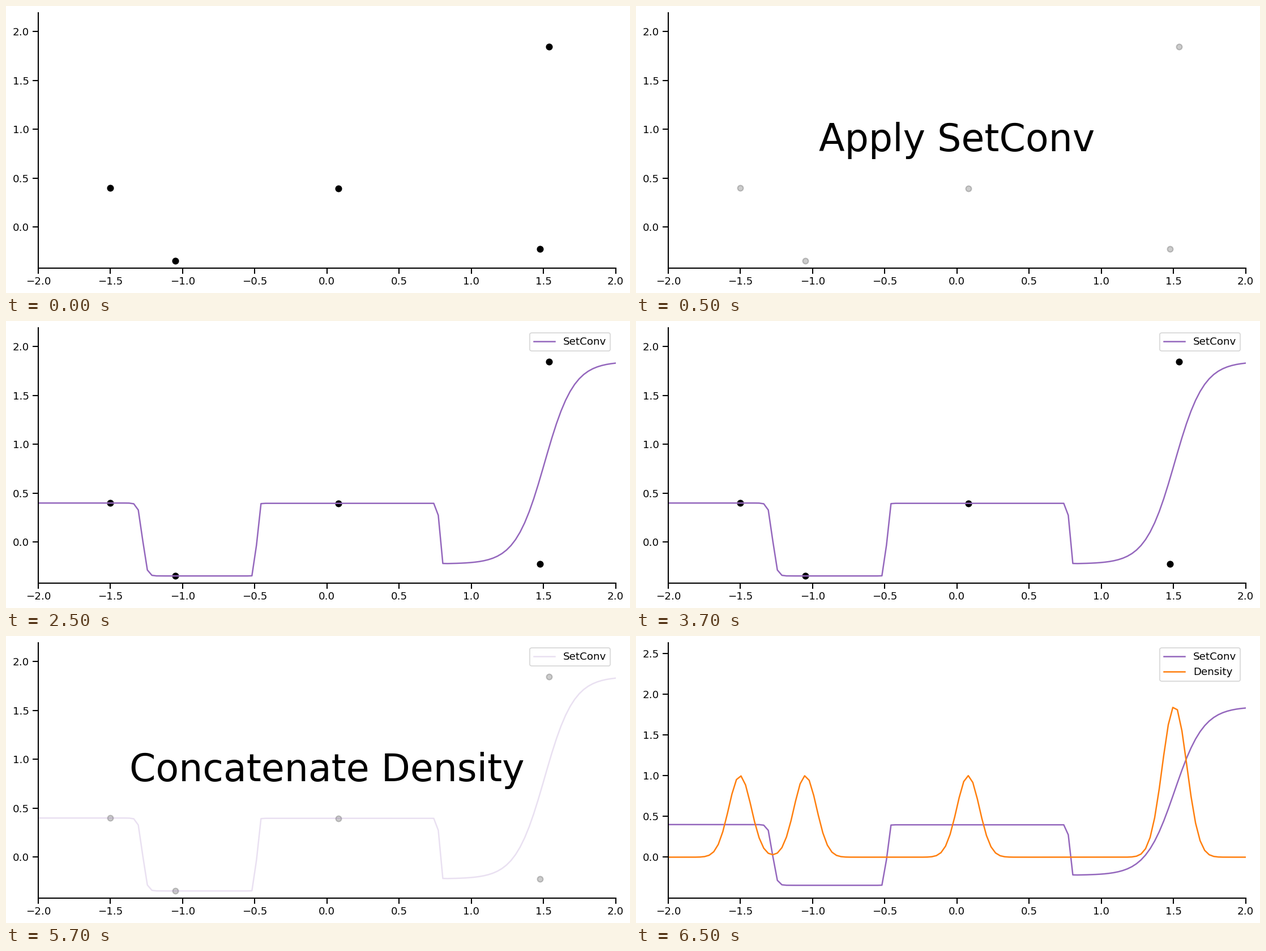
A matplotlib script for the animation above (8 s loop, 1102 by 508 pixels).

```python
import numpy as np
import matplotlib.pyplot as plt
from matplotlib.animation import FuncAnimation

WIDTH, HEIGHT, DPI = 1102, 508, 128
STEP_MS = 500
PURPLE, ORANGE = "#9467bd", "#ff7f0e"
LENGTH_SCALE = 5 / 64
FADED = 0.2


def px(n):
    """Pixels to points."""
    return n * 72 / DPI


plt.rcParams.update({
    "font.family": "DejaVu Sans",
    "font.size": px(18.33),
    "axes.linewidth": px(2.08),
    "lines.linewidth": px(2.5),
    "patch.linewidth": px(1.67),
    "legend.fontsize": px(18.33),
})
for axis in ("xtick", "ytick"):
    plt.rcParams.update({
        f"{axis}.labelsize": px(18.33),
        f"{axis}.major.size": px(10),
        f"{axis}.major.width": px(2.08),
        f"{axis}.major.pad": px(5.8),
    })

# Context set and its kernel-smoothed functional representation
x_ctx = np.array([-1.503, -1.0505, 0.0775, 1.478, 1.5385])
y_ctx = np.array([0.400, -0.345, 0.397, -0.221, 1.845])
grid = np.linspace(-2, 2, 128)
kernel = np.exp(-0.5 * ((grid[:, None] - x_ctx) / LENGTH_SCALE) ** 2)
density = kernel.sum(axis=1)
set_conv = kernel @ y_ctx / density

fig = plt.figure(figsize=(WIDTH / DPI, HEIGHT / DPI), dpi=DPI, facecolor="white")
left, right, bottom, top = 57, 1076.5, 463.5, 11.5
ax = fig.add_axes([left / WIDTH, 1 - bottom / HEIGHT,
                   (right - left) / WIDTH, (bottom - top) / HEIGHT])
ax.spines[["top", "right"]].set_visible(False)
ax.set_xlim(-2, 2)

dots, = ax.plot(x_ctx, y_ctx, "o", color="black", ms=px(10), mew=px(2.08), zorder=1)
conv_line, = ax.plot(grid, set_conv, color=PURPLE, label="SetConv")
density_line, = ax.plot(grid, density, color=ORANGE, label="Density")
caption = ax.text(0.5, 0.5, "", transform=ax.transAxes, fontsize=px(66.67),
                  ha="center", va="center", zorder=5)

# (start in ms, caption, dots shown, curves shown)
STAGES = [
    (0, "", True, []),
    (500, "Apply SetConv", True, []),
    (2500, "", True, [conv_line]),
    (4500, "Concatenate Density", True, [conv_line]),
    (6500, "", False, [conv_line, density_line]),
]


def update(frame):
    now = frame * STEP_MS
    _, text, show_dots, curves = [s for s in STAGES if s[0] <= now][-1]
    alpha = FADED if text else 1

    caption.set_text(text)
    dots.set_visible(show_dots)
    for line in (dots, conv_line, density_line):
        line.set_alpha(alpha)
    for line in (conv_line, density_line):
        line.set_visible(line in curves)

    if density_line in curves:
        ax.set_ylim(-0.499, 2.633)
    else:
        ax.set_ylim(-0.4156, 2.1934)
    ax.set_yticks(np.arange(0, ax.get_ylim()[1], 0.5))

    if ax.get_legend():
        ax.get_legend().remove()
    if curves:
        ax.legend(handles=curves, loc="upper right")
    return []


animation = FuncAnimation(fig, update, frames=16, interval=STEP_MS,
                          init_func=lambda: update(0), repeat=True,
                          repeat_delay=0, blit=False)
plt.show()
```
